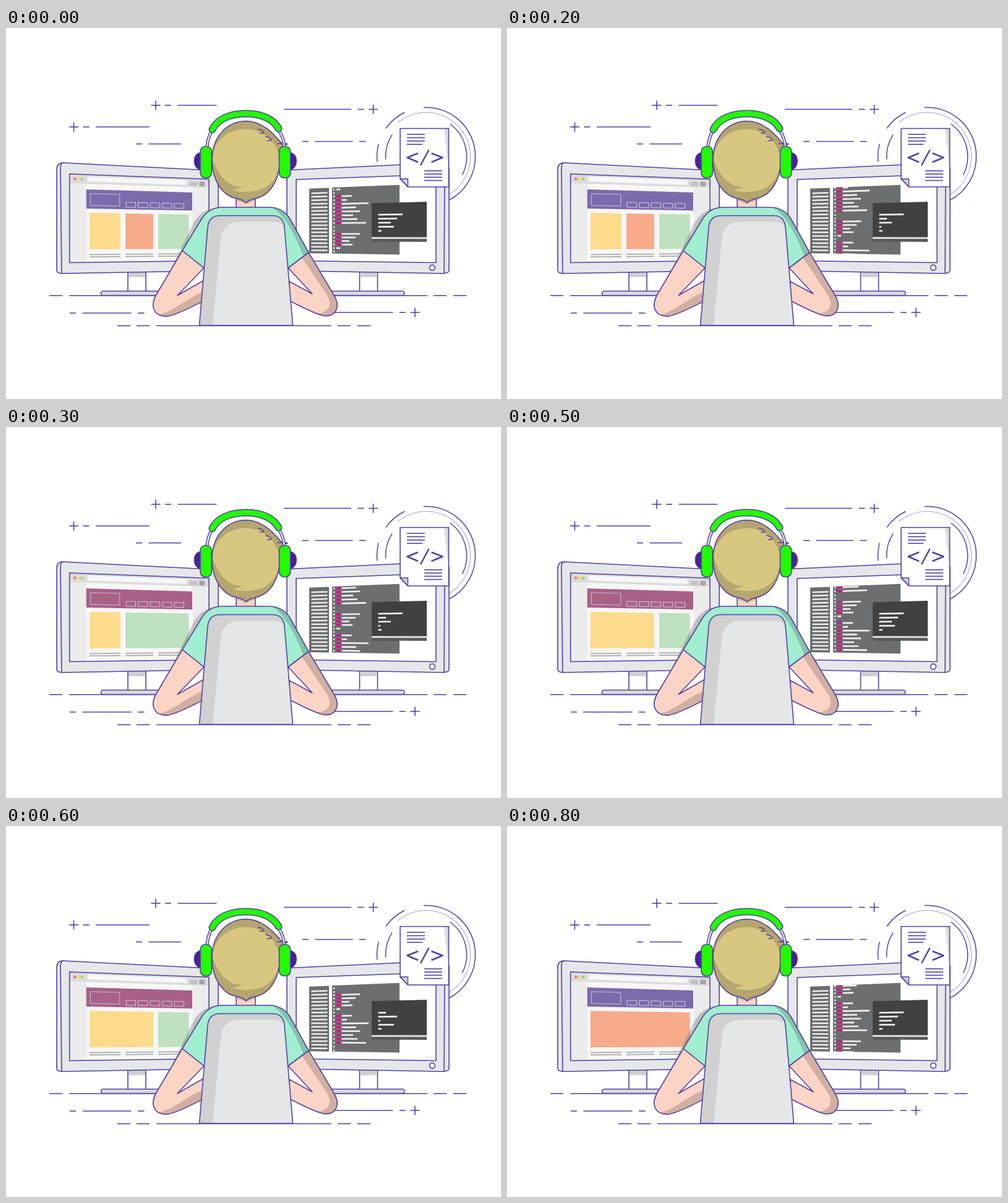
These frames come from a looping animation (800x600 px, 0.9 s). An HTML page with a canvas:

```html
<!DOCTYPE html>
<html lang="en">
<head>
<meta charset="utf-8">
<title>Coder at work</title>
<style>
html, body { margin: 0; width: 100%; height: 100%; overflow: hidden; background: #fff; }
canvas { display: block; }
</style>
</head>
<body>
<canvas id="stage" width="800" height="600"></canvas>
<script>
const ctx = document.getElementById('stage').getContext('2d');
const INK = '#5242a0', FRAME = '#e6e7ea', PALE = '#f2f2f2';
const SKIN = '#fcd4c6', SKIN_DARK = '#d1afa3', SHIRT = '#a2eed0', SHIRT_DARK = '#85c4ac';
const GREEN = '#22fa00', VIOLET = '#4b1f98';
const YELLOW = '#fddb8d', ORANGE = '#f8ab8b', MINT = '#bee1c0', PURPLE = '#7c6bab', MAUVE = '#a96187';
const LOOP = 900, STEP = 100;

function paint(path, fill, stroke, width = 1.6) {
  if (fill) { ctx.fillStyle = fill; ctx.fill(path); }
  if (stroke) { ctx.strokeStyle = stroke; ctx.lineWidth = width; ctx.stroke(path); }
}

const shape = (d, ...style) => paint(new Path2D(d), ...style);

const line = (x1, y1, x2, y2, color = INK, width = 1.6) =>
  shape(`M${x1} ${y1}L${x2} ${y2}`, null, color, width);

function disc(x, y, r, ...style) {
  const path = new Path2D();
  path.arc(x, y, r, 0, Math.PI * 2);
  paint(path, ...style);
}

function pill(x, y, w, h, r, ...style) {
  const path = new Path2D();
  path.roundRect(x, y, w, h, r);
  paint(path, ...style);
}

// Perspective of each screen: rows tilt more the further they are from eye level.
const leftTilt = (x, y) => y + (x - 103) * (342 - y) * 0.000356;
const rightTilt = (x, y) => y + (x - 542) * (y - 335) * 0.0005;

const slabPath = (tilt, x1, y1, x2, y2) => new Path2D(
  `M${x1} ${tilt(x1, y1)}L${x2} ${tilt(x2, y1)}L${x2} ${tilt(x2, y2)}L${x1} ${tilt(x1, y2)}Z`);

const slab = (tilt, x1, y1, x2, y2, ...style) => paint(slabPath(tilt, x1, y1, x2, y2), ...style);

const bar = (tilt, x1, x2, y, color, width) => line(x1, tilt(x1, y), x2, tilt(x2, y), color, width);

function plus(x, y) {
  line(x - 7.5, y, x + 7.5, y);
  line(x, y - 7.5, x, y + 7.5);
}

// A short dash and a long one, running away from x.
function streak(x, y, length, { dir = 1, cross = false, tail = false } = {}) {
  const dash = (a, b) => line(x + a * dir, y, x + b * dir, y);
  if (cross) plus(x, y);
  dash(15, 25);
  dash(35.5, 35.5 + length);
  if (tail) dash(length + 46, length + 56.5);
}

// A long line with dashes trailing off at both ends.
function ground(y, from, to, before, after) {
  line(from, y, to, y);
  for (let i = 0; i < before; i++) line(from - 11 - i * 31, y, from - 32 - i * 31, y);
  for (let i = 0; i < after; i++) line(to + 10 + i * 32, y, to + 31 + i * 32, y);
}

function ring(r, from, to, dash = []) {
  const path = new Path2D();
  path.arc(679, 208, r, from * Math.PI / 180, to * Math.PI / 180);
  ctx.setLineDash(dash);
  paint(path, null, INK, dash.length ? 1.1 : 1.5);
  ctx.setLineDash([]);
}

function drawBackdrop() {
  streak(109.5, 160, 87, { cross: true });
  streak(242, 125, 63, { cross: true });
  streak(195, 187.5, 52.5);
  streak(593.5, 131.5, 109, { dir: -1, cross: true });
  streak(464, 183.5, 61, { tail: true });
  streak(88, 461, 79, { tail: true });
  streak(661, 460, 96, { dir: -1, cross: true });

  ring(79.5, -93, 63);
  ring(79.5, 174, 195);
  ring(79.5, 215, 244);
  ring(65.5, 176, 213);
  ring(65.5, -54, 27);
  ring(71.5, 231, 420, [1.2, 1.4]);
}

function drawStand(x, from, to) {
  pill(x, 394, 29, 33, 0, '#fff', INK);
  pill(x + 1, 395, 27, 8, 0, '#cfcfd1');
  pill(from, 425.5, to - from, 7, 3.5, '#d9dadc', INK);
}

// Cards name the first and last column they cover.
const COLUMNS = [[135, 185], [193, 238], [246, 295.5]];
const LAYOUTS = [
  { until: 3, head: PURPLE, cards: [[0, 0, YELLOW], [1, 1, ORANGE], [2, 2, MINT]] },
  { until: 5, head: MAUVE, cards: [[0, 0, YELLOW], [1, 2, MINT]] },
  { until: 7, head: MAUVE, cards: [[0, 1, YELLOW], [2, 2, MINT]] },
  { until: 9, head: PURPLE, cards: [[0, 2, ORANGE]] }
];

function drawBrowser(step) {
  const { head, cards } = LAYOUTS.find(l => step < l.until);
  const block = (...args) => slab(leftTilt, ...args);
  block(103, 236, 328, 379.5, '#ececed');
  block(130, 251, 302, 379, '#f7f7f7');
  block(103, 236, 328, 251, '#dcdcdc');
  ['#f2736c', '#fbdc4c', '#a9cf6d'].forEach((color, i) => disc(111.3 + i * 5.9, 244 + i * 0.2, 2.3, color));
  block(132, 239.3, 292, 247.3, '#f7f7f7');
  block(297, 242, 309, 249.3, '#c2c2c2');
  block(312.5, 241, 321, 249, '#a3a3a3');

  block(129.7, 260.2, 301, 291.6, head);
  block(136.5, 267, 183.8, 286.3, null, '#c9bede', 1);
  for (let i = 0; i < 5; i++) {
    const x = 194 + i * 19.5;
    block(x, 279.9, x + 15.5, 288.1, null, '#d3cae3', 1);
  }

  for (const [first, last, color] of cards) block(COLUMNS[first][0], 298.6, COLUMNS[last][1], 358.3, color);
  for (const [a, b] of COLUMNS) {
    bar(leftTilt, a, b, 366.8, '#a0a0a0', 1.5);
    bar(leftTilt, a, b, 370.6, '#a0a0a0', 1.5);
  }
}

function drawLeftMonitor(step) {
  drawStand(197, 153.5, 256);
  shape('M92 218L337 230.5Q343 231 343 237V392.5L90 397L85 396Q82 395 82 391V229Q82 218 92 218Z', FRAME, INK);
  shape('M92 218Q88 219 88 227L90 397', null, INK);
  drawBrowser(step);
  slab(leftTilt, 102.7, 236, 328, 379.5, null, INK);
}

const PERIOD = 95;
// Right ends of the code rows; the shortest row has no keyword.
const BLOCKS = [
  { y: 0, pitch: 6.2, ends: [559, 551, 586, 566, 572, 561, 568, 582] },
  { y: 61, pitch: 5.75, ends: [572, 565, 555, 560, 540] }
];

function drawRow(y, end) {
  const keyword = end > 540;
  bar(rightTilt, 529, 531.3, y, PALE, 2.6);
  if (keyword) bar(rightTilt, 533, 542, y, '#d3158a', 3);
  bar(rightTilt, keyword ? 542.3 : 534, end, y, PALE, 2.6);
}

function drawCode(step) {
  slab(rightTilt, 490, 257.7, 522, 365, '#6b6c6e');
  for (let i = 0; i < 17; i++) bar(rightTilt, 493.5, 519.5, 265.6 + i * 5.9, '#ededed', 2.5);

  const panel = slabPath(rightTilt, 527, 257.5, 636, 365);
  paint(panel, '#6d6e70');
  ctx.save();
  ctx.clip(panel);
  for (let base = 272 - step * 10 - PERIOD; base < 370; base += PERIOD) {
    for (const { y, pitch, ends } of BLOCKS) ends.forEach((end, i) => drawRow(base + y + i * pitch, end));
    for (const gap of [50, 56, 89.5]) bar(rightTilt, 529, 531.3, base + gap, PALE, 2.6);
  }
  ctx.restore();
}

function terminalEnds(step) {
  const ends = [641, 632, 622, 627, 607];
  const pair = Math.floor(step / 2);
  if (pair === 1 || pair === 3) {
    const first = pair === 1 ? 1 : 0;
    ends[first] = 614;
    ends[first + 2] = 605;
  }
  return ends;
}

function drawTerminal(step) {
  slab(rightTilt, 591, 284.4, 680, 345, '#414141');
  slab(rightTilt, 591, 338, 680, 341, '#dededf');
  slab(rightTilt, 591, 341, 680, 344.7, '#58595b');
  terminalEnds(step).forEach((end, i) => bar(rightTilt, 601.5, end, 303 + i * 6.3, PALE, 2.6));
}

function drawRightMonitor(step) {
  drawStand(571.5, 520, 644);
  shape('M460 229.5L706 218Q716 218 716 229V391Q716 395 712 396L708 397L454 392.5V236Q454 230 460 229.5Z', FRAME, INK);
  shape('M706 218Q709 219 709 227L708 397', null, INK);
  shape('M469 245L695 237V379.5L469 376.5Z', '#fff', INK);
  disc(689, 387.5, 4.4, '#fff', INK);
  drawCode(step);
  drawTerminal(step);
}

function drawDocument() {
  const page = 'M637 162.5H715.5V257H649.5L637 244Z';
  shape(page, '#fff');
  shape('M708 163H715V225Z', '#dcdcde');
  shape('M637 244H649.5V257Z', '#cfcfd1', INK, 1.4);
  shape(page, null, INK);
  for (let i = 0; i < 4; i++) {
    line(648, 172 + i * 5.4, i === 3 ? 673 : 677, 172 + i * 5.4);
    line(676, 231 + i * 5.2, 705, 231 + i * 5.2);
  }
  shape('M666 202.5L648.5 209.5L666 217M687.5 202.5L705.5 209.5L687.5 217M683.5 197L670 222', null, INK, 2.5);
}

function drawBody() {
  shape('M350 290C328 289 312 299 303 316L266 391L285 361L318 307Q328 291 350 290Z', 'rgba(90,90,90,.3)');

  const left = 'M285 360L243 431C232 450 239 468 262 466C278 463 300 451 320 441V408L277 432.5L320 388Z';
  const right = 'M489 363L530 432C541 450 534 467 514 465.5C498 462 476 450 458 441V410L495 430L456 388Z';
  shape(left, SKIN);
  shape('M245 463C265 463 290 438 320 426V441C300 451 278 463 262 466Q251 467 245 463Z', SKIN_DARK);
  shape(left, null, INK);
  shape(right, SKIN);
  shape('M489 363L530 432C541 450 534 467 514 465.5L503 462C520 460 528 450 520 434L478 371Z', SKIN_DARK);
  shape(right, null, INK);

  shape('M372 270H403V291H372Z', SKIN, INK);
  shape('M373 272H402V279L388 284L373 279Z', SKIN_DARK);

  const shirt = 'M320 388L285 360L316 309C324 296 335 290 350 290H425C440 290 450 296 458 307L489 363L456 388Z';
  shape(shirt, SHIRT);
  shape('M430 290Q450 293 458 307L489 363L481 369.5C468 338 454 306 430 290Z', SHIRT_DARK);
  shape(shirt, null, INK);
}

function drawChair() {
  const back = 'M312.5 481L326 322Q328 303.5 346 303.5H431Q448 303.5 450 322L463.5 481Z';
  shape(back, '#d1d1d2');
  shape('M334 481L347 342Q350 313.5 378 313.5H433Q447 313.5 450 324L463.5 481Z', '#e5e6e8');
  shape(back, null, INK);
}

function drawHead() {
  const hair = 'M388 150.5C356 151 333 177 333 213C333 247 350 272 374 276Q384 278 388 283Q392 278 402 276'
    + 'C427 271 442.5 246 442.5 213Q442 201 445 193L455 187.5L445 186C431 169 414 151 388 150.5Z';
  shape(hair, '#b5a56e');
  shape('M333.5 211C336 184 357 163.5 388 163.5C418 164 440 187 442 213C443 235 430 258 406 263'
    + 'Q383 268 366 262Q375 260 383 257C360 258 343 240 333.5 211Z', '#d7c781');
  shape(hair, null, INK);
  for (const [x, y] of [[407, 163.5], [419, 175.5]]) {
    shape(`M${x} ${y}Q${x + 8} ${y + 1} ${x + 10} ${y + 6}L${x + 3} ${y + 7}`, null, INK, 1.4);
  }
  line(438, 187, 455, 187.5, INK, 1.4);
}

function rod(d) {
  shape(d, null, INK, 5.2);
  shape(d, null, '#e3e4e8', 2.4);
}

function drawHeadphones() {
  rod('M333 166Q326 177 324.5 195');
  rod('M441 166Q449 177 450 195');
  const band = 'M333.5 164C342 147 362 138.5 388 138.5C413 138.5 432 147 440.5 162.5';
  ctx.lineCap = 'round';
  shape(band, null, INK, 12);
  shape(band, null, GREEN, 8.8);
  ctx.lineCap = 'butt';
  shape('M315 201Q304 203 304 215Q304 227 315 230Z', VIOLET, INK, 1);
  shape('M459 201Q469.5 203 469.5 215Q469.5 227 459 230Z', VIOLET, INK, 1);
  for (const x of [314, 441.5]) pill(x, 191.5, 18.3, 51, 8, GREEN, INK);
}

function draw(step) {
  ctx.fillStyle = '#fff';
  ctx.fillRect(0, 0, 800, 600);
  ctx.lineJoin = 'round';
  drawBackdrop();
  drawLeftMonitor(step);
  drawRightMonitor(step);
  drawDocument();
  ground(432.7, 102, 681, 1, 2);
  // Clear the gaps between forearms and chair.
  shape('M277 432.5L320 388V408ZM495 430L456 388V410Z', '#fff');
  drawBody();
  drawChair();
  ground(481.5, 243, 526, 2, 2);
  drawHead();
  drawHeadphones();
}

const start = performance.now();
function tick() {
  draw(Math.floor((performance.now() - start) % LOOP / STEP));
  requestAnimationFrame(tick);
}
tick();
</script>
</body>
</html>
```
